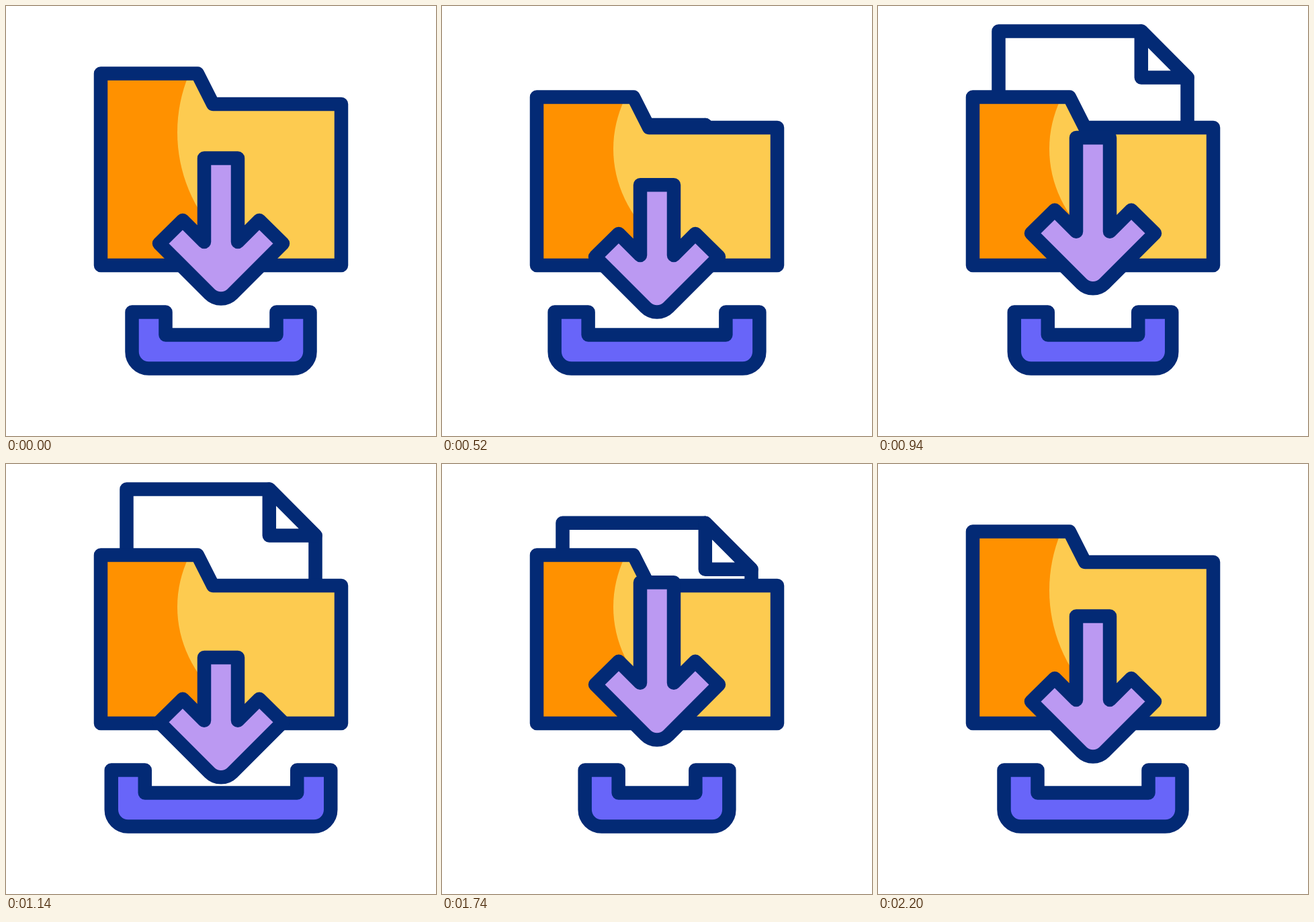
An HTML page with a canvas for the animation above (2.42 s loop, 640 px wide and 640 px high).

```html
<!DOCTYPE html>
<html lang="en">
<head>
<meta charset="utf-8">
<title>Folder download</title>
<style>
  html, body { margin: 0; width: 100%; height: 100%; overflow: hidden; background: #fff; }
  canvas { display: block; }
</style>
</head>
<body>
<canvas id="stage" width="640" height="640"></canvas>
<script>
const ctx = document.getElementById('stage').getContext('2d');
const STEP = 20, LOOP = 2420;
const NAVY = '#032a75', ORANGE = '#ff9100', YELLOW = '#fdcb50',
      LILAC = '#bb99f2', VIOLET = '#6865f9', WHITE = '#fff';

// Keyframes are [time, value] pairs, eased in and out.
const SWING = [[0, 0], [400, 35], [800, -35], [1200, 35], [1600, -35], [2000, 0]];
const FOLDER_DROP = [[200, 0], [400, 35], [2000, 35], [2200, 0]];
const PAPER_TOP = [[400, 215.5], [800, 37.5], [1600, 37.5], [2000, 215.5]];

function valueAt(keys, t) {
  if (t <= keys[0][0]) return keys[0][1];
  for (let i = 1; i < keys.length; i++) {
    const [t0, a] = keys[i - 1], [t1, b] = keys[i];
    if (t < t1) {
      const s = (t - t0) / (t1 - t0);
      return a + (b - a) * s * s * (3 - 2 * s);
    }
  }
  return keys[keys.length - 1][1];
}

// A point may carry a third number: its corner radius.
function shape(points) {
  const path = new Path2D();
  points.forEach(([x, y, r], i) => {
    if (r) path.arcTo(x, y, ...points[(i + 1) % points.length].slice(0, 2), r);
    else if (i) path.lineTo(x, y);
    else path.moveTo(x, y);
  });
  path.closePath();
  return path;
}

function paint(path, fill) {
  ctx.fillStyle = fill;
  ctx.fill(path);
  ctx.stroke(path);
}

function drawPaper(top) {
  const fold = top + 69, bottom = top + 165;
  paint(shape([[179.5, top], [391.8, top], [460.5, fold], [460.5, bottom], [179.5, bottom]]), WHITE);
  paint(shape([[391.8, top], [460.5, fold], [391.8, fold]]), WHITE);
}

function drawFolder(drop) {
  const top = 100.5 + drop, low = 146 + drop;
  const body = shape([[141, top], [285, top], [308, low], [499, low], [499, 386], [141, 386]]);
  const squash = (266 - drop) / 266;
  ctx.fillStyle = ORANGE;
  ctx.fill(body);
  ctx.save();
  ctx.clip(body);
  ctx.fillStyle = YELLOW;
  ctx.beginPath();
  ctx.ellipse(479, 376 - 188 * squash, 224, 224 * squash, 0, 0, Math.PI * 2);
  ctx.fill();
  ctx.fillRect(400, top, 100, 290);
  ctx.restore();
  ctx.stroke(body);
}

function drawArrow(d) {
  const top = 226.5 + 2 * d;
  paint(shape([
    [295, top], [345, top], [345, 351 + d], [377, 319 + d], [412, 353.5 + d],
    [320, 445.5 + d, 24], [228, 353.5 + d], [263, 319 + d], [295, 351 + d]
  ]), LILAC);
}

function drawTray(d) {
  const left = 187.5 - d, right = 452.5 + d;
  paint(shape([
    [left, 455.5], [left + 50, 455.5], [left + 50, 489.5], [right - 50, 489.5],
    [right - 50, 455.5], [right, 455.5], [right, 539.5, 25], [left, 539.5, 25]
  ]), VIOLET);
}

function render(now) {
  const t = Math.floor((now % LOOP) / STEP) * STEP;
  const swing = valueAt(SWING, t);
  ctx.fillStyle = WHITE;
  ctx.fillRect(0, 0, 640, 640);
  ctx.strokeStyle = NAVY;
  ctx.lineWidth = 20.5;
  ctx.lineJoin = 'round';
  drawPaper(valueAt(PAPER_TOP, t));
  drawFolder(valueAt(FOLDER_DROP, t));
  drawTray(swing);
  drawArrow(swing);
}

const start = performance.now();
function tick() {
  render(performance.now() - start);
  requestAnimationFrame(tick);
}
tick();
</script>
</body>
</html>
```
